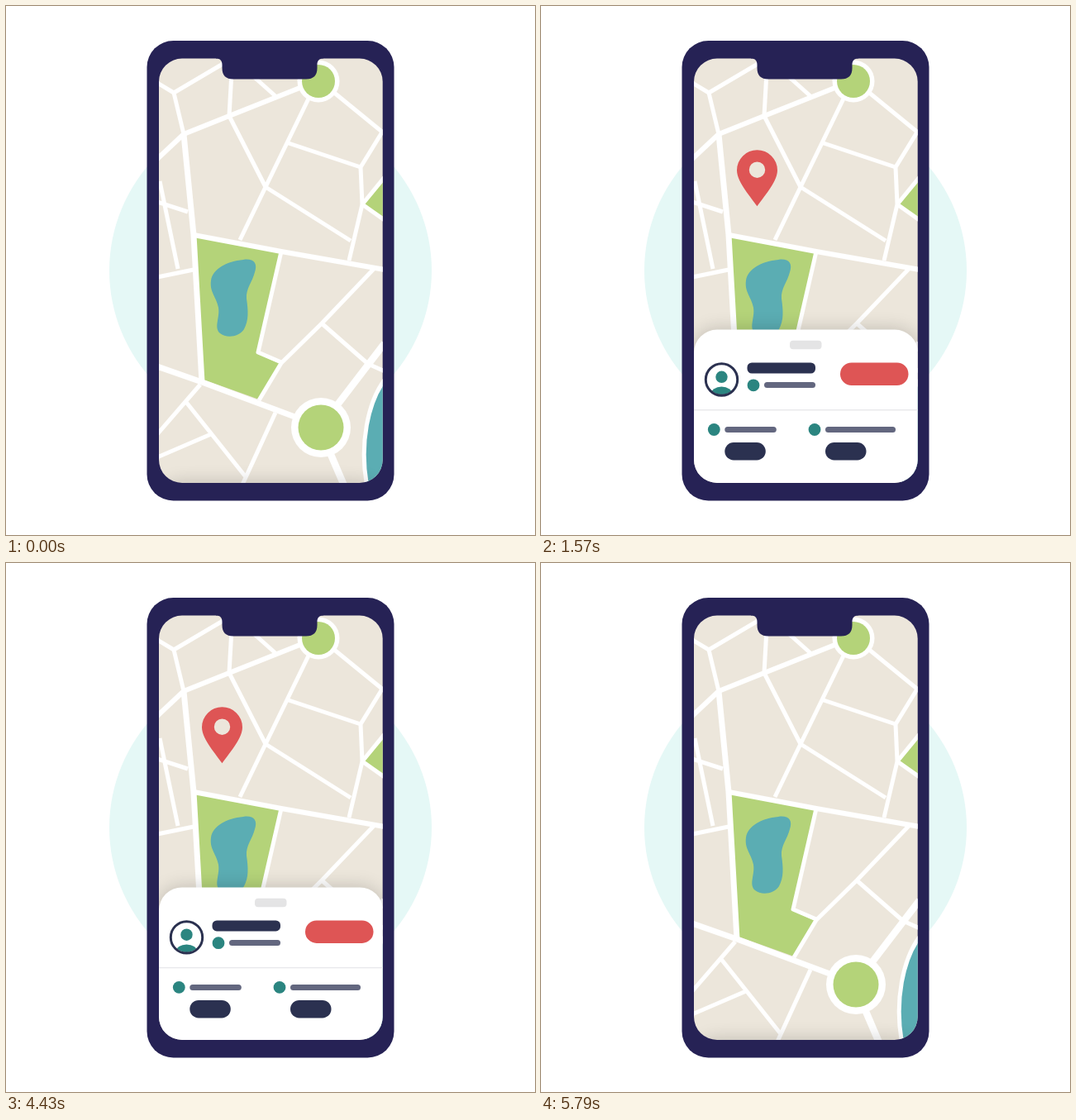
An HTML page with a canvas for the animation above (7210 ms loop, 640 by 640 pixels).

```html
<!DOCTYPE html>
<html lang="en">
<head>
<meta charset="utf-8">
<title>Map and booking sheet</title>
<style>
  html, body { margin: 0; width: 100%; height: 100%; overflow: hidden; background: #fff; }
  canvas { display: block; width: 640px; height: 640px; }
</style>
</head>
<body>
<canvas id="stage" width="640" height="640"></canvas>
<script>
const ctx = document.getElementById('stage').getContext('2d');
const LOOP = 7210, STEP = LOOP / 101;
const NAVY = '#262255', INK = '#2b3150', SLATE = '#63677f', TEAL = '#2b8580';
const LAND = '#ece6db', GREEN = '#b4d379', WATER = '#5badb3', RED = '#de5555';
const SHEET_TOP = 391.5, SCREEN_BOTTOM = 577;

const span = (t, from, to) => Math.min(1, Math.max(0, (t - from) / (to - from)));
const smooth = p => p * p * (3 - 2 * p);
const cubic = p => p < .5 ? 4 * p ** 3 : 1 - 4 * (1 - p) ** 3;

function pill(x, y, w, h, r, color) {
  ctx.beginPath();
  ctx.roundRect(x, y, w, h, r);
  ctx.fillStyle = color;
  ctx.fill();
}

function disc(x, y, r, color) {
  ctx.beginPath();
  ctx.arc(x, y, r, 0, Math.PI * 2);
  ctx.fillStyle = color;
  ctx.fill();
}

function shape(d, fill, stroke, width) {
  const path = new Path2D(d);
  if (fill) { ctx.fillStyle = fill; ctx.fill(path); }
  if (stroke) { ctx.strokeStyle = stroke; ctx.lineWidth = width; ctx.stroke(path); }
}

const STREETS = `M183 93L203 105L264 69 M203 105L215 155 M270 133L273 80 M298 84L326 109
  M270 133L314 219L283 283 M314 219L368 108 M342 166L429 195L456 151 M396 104L456 153
  M429 195L431 240L415 308 M314 219L417 284 M183 237L220 249 M186 212L208 318
  M183 328L227 319 M445 318L382 384L333 432L306 477 M382 384L438 433L458 442
  M333 297L305 419L333 431 M235 458L183 518 M217 478L291 571 M248 518L183 546
  M326 492L286 579 M458 207L431 240L458 259`;
const AVENUES = 'M183 185L215 155L270 133L358 98 M227 277L333 297L458 319';
const MAINS = 'M215 155L227 277L237 455 M183 436L237 455L352 498';

function drawMap() {
  ctx.lineJoin = 'round';
  shape('M228 278L331 298L303 420L332 433L306 476L239 452Z', GREEN);
  shape('M434 239L458 208V258Z', GREEN);
  shape(STREETS, null, '#fff', 5);
  shape(AVENUES, null, '#fff', 6);
  shape(MAINS, null, '#fff', 7);
  shape('M458 408L399 485 M391 538L409 580', null, '#fff', 8.5);
  shape('M459 451C438 478 427 530 437 582H462Z', WATER, '#fff', 5);
  shape(`M287 307C299 305 305 311 301 322C298 334 290 342 291 354
    C293 368 294 380 288 391C282 401 266 402 259 396C251 389 259 377 257 365
    C255 353 246 346 248 332C250 318 267 309 287 307Z`, WATER);
  disc(378, 91, 25.5, '#fff');
  disc(378, 91, 20, GREEN);
  disc(381, 510, 36, '#fff');
  disc(381, 510, 27.5, GREEN);
}

function drawPin(scale) {
  if (scale <= 0) return;
  ctx.save();
  ctx.translate(261.5, 208.2);
  ctx.scale(scale, scale);
  const pin = new Path2D('M0 34C-6 25 -24.5 5 -24.5 -9.5A24.5 24.5 0 0 1 24.5 -9.5C24.5 5 6 25 0 34Z');
  pin.arc(0, -10, 9.7, 0, Math.PI * 2);
  ctx.fillStyle = RED;
  ctx.fill(pin, 'evenodd');
  ctx.restore();
}

function drawAvatar() {
  ctx.save();
  ctx.beginPath();
  ctx.arc(218.5, 60.5, 18, 0, Math.PI * 2);
  ctx.clip();
  disc(218.5, 57.3, 7.2, TEAL);
  ctx.beginPath();
  ctx.ellipse(218.5, 78, 13, 9, 0, 0, Math.PI * 2);
  ctx.fill();
  ctx.restore();
  ctx.beginPath();
  ctx.arc(218.5, 60.5, 19.2, 0, Math.PI * 2);
  ctx.strokeStyle = INK;
  ctx.lineWidth = 3;
  ctx.stroke();
}

function drawButton(tap) {
  ctx.save();
  pill(362, 40, 82.5, 27.5, 13.7, RED);
  if (tap > 0 && tap < 1) {
    ctx.clip();
    ctx.globalAlpha = .45 * (1 - tap);
    disc(403, 52, 36 * (1 - (1 - tap) ** 2), '#fff');
  }
  ctx.restore();
}

function drawField(x, barWidth) {
  disc(x, 121, 7.4, TEAL);
  pill(x + 13, 117.5, barWidth, 7, 3.5, SLATE);
  pill(x + 13, 136.5, 49.5, 21.5, 10.7, INK);
}

function drawSheet(top, tap) {
  ctx.save();
  ctx.translate(0, top);
  ctx.shadowColor = 'rgba(0,0,0,.2)';
  ctx.shadowBlur = 22;
  pill(185, 0, 271, 240, 28, '#fff');
  ctx.shadowColor = 'transparent';
  pill(301, 13.3, 38.5, 10.5, 4, '#e4e4e5');
  drawAvatar();
  pill(249.5, 40, 82.5, 13, 5.5, INK);
  disc(257, 67.3, 7.4, TEAL);
  pill(270, 63.5, 62, 7, 3.5, SLATE);
  drawButton(tap);
  ctx.fillStyle = '#e9e9ec';
  ctx.fillRect(185, 96.5, 271, 1.5);
  drawField(209.3, 62.5);
  drawField(331, 85);
  ctx.restore();
}

function pinScale(t) {
  if (t < 1070) return 1.25 * smooth(span(t, 317, 1070));
  if (t < 3000) return 1.25 - .25 * smooth(span(t, 1070, 1540));
  return 1 - smooth(span(t, 5150, 5770));
}

function draw(t) {
  const raised = cubic(span(t, 325, 1280)) - cubic(span(t, 4332, 5221));
  ctx.fillStyle = '#fff';
  ctx.fillRect(0, 0, 640, 640);
  disc(320, 320, 195, '#e5f8f6');
  pill(170.5, 42, 299, 556.5, 32, NAVY);

  ctx.save();
  pill(185, 63.5, 270.7, 513.5, 28, LAND);
  ctx.clip();
  drawMap();
  drawPin(pinScale(t));
  drawSheet(SCREEN_BOTTOM - (SCREEN_BOTTOM - SHEET_TOP) * raised, span(t, 3200, 3960));
  ctx.restore();

  shape('M254 62V63.5C259 63.5 261.5 66 261.5 71V75C261.5 84 266 88.5 275 88.5H363C372 88.5 376.5 84 376.5 75V71C376.5 66 379 63.5 384 63.5V62Z', NAVY);
}

function frame() {
  const t = performance.now() % LOOP;
  draw(Math.floor((t + 5) / STEP) * STEP % LOOP);
  requestAnimationFrame(frame);
}
frame();
</script>
</body>
</html>
```
